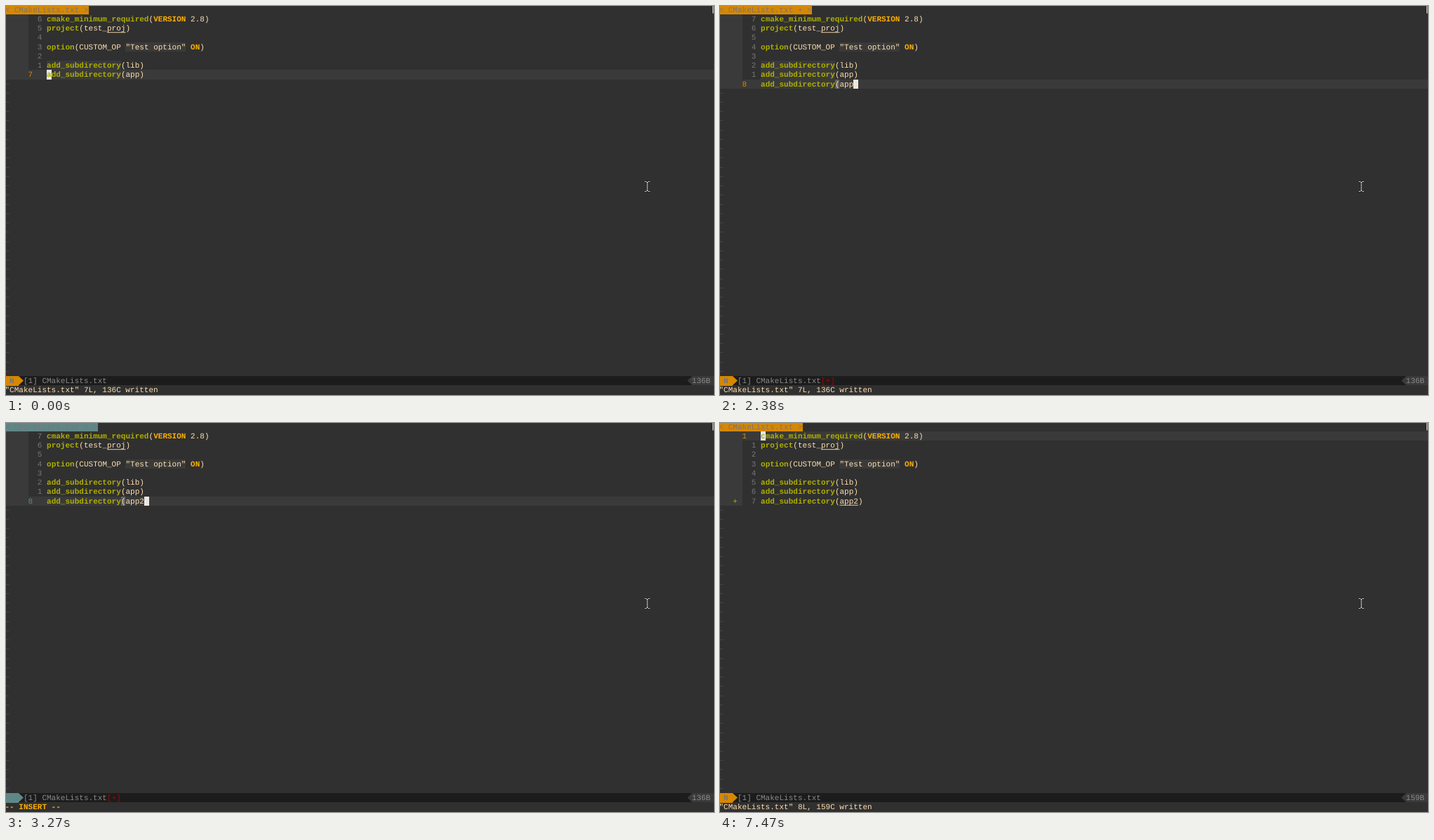
These frames come from a looping animation (1009x555 px, 8000 ms). An HTML page:

```html
<!DOCTYPE html>
<html lang="en">
<head>
<meta charset="utf-8">
<title>Editing a build file</title>
<style>
html, body { margin: 0; width: 100%; height: 100%; overflow: hidden; background: #303030; }
svg { display: block; width: 1009px; height: 555px; }
text {
  font: 11.025px "Liberation Mono", "Courier New", monospace;
  white-space: pre;
  text-rendering: geometricPrecision;
}
.bold { font-weight: bold; }
</style>
</head>
<body>
<svg id="stage" viewBox="0 0 1009 555"></svg>
<script>
(() => {
const LOOP = 8000;
const CELL_W = 6.615, CELL_H = 13.24;
const C = {
  bg: '#303030', raised: '#3a3a3a', bar: '#1c1c1c', menu: '#4e4e4e', match: '#626262',
  dim: '#767676', gray: '#8a8a8a', tilde: '#4e4e4e', fg: '#ffdfaf', green: '#afaf00',
  gold: '#ffaf00', orange: '#d78700', flash: '#ff8700', teal: '#5f8787',
  red: '#af0000', cursor: '#e8e8e8', prompt: '#c8c8c8'
};

const MENU = [
  ['app"', 'S [YANK]'], ['apply', 'S [YANK]'], ['app_stdio', 'S [YANK]'],
  ['append', '  [T]'], ['append_line', '  [T]'], ['actPreviewPageUp', '  [T]'],
  ['actPreviewPageDown', '  [T]'], ['algo.charUpper', '  [T]'], ['actPageUp', '  [T]'],
  ['actPreviewUp', '  [T]'], ['algo.TestEmptyPattern', '  [T]']
];

// Each step changes part of the editor state from its time onwards.
const STEPS = [
  [0, { args: ['lib', 'app'], row: 7, col: 0, words: true, size: '136B', keys: '',
        message: '"CMakeLists.txt" 7L, 136C written' }],
  [1040, { keys: 'y' }],
  [1190, { keys: '' }],
  [1490, { args: ['lib', 'app', 'app'], row: 8, dirty: true, flash: true }],
  [1780, { flash: false }],
  [1930, { keys: 'f' }],
  [2380, { keys: '', col: 20, paren: true }],
  [2970, { insert: true, words: false, message: '-- INSERT --' }],
  [3120, { menu: true, paren: false }],
  [3270, { menu: false, paren: true, args: ['lib', 'app', 'app2'], col: 21 }],
  [3720, { insert: false, paren: false, col: 20, spell: true, message: '' }],
  [4620, { command: true, message: ':' }],
  [5520, { message: ':w' }],
  [6270, { command: false, dirty: false, added: true, size: '159B',
           message: '"CMakeLists.txt" 8L, 159C written' }],
  [7320, { keys: 'g' }],
  [7470, { keys: '', row: 1, col: 0 }]
];

const colX = col => col * CELL_W - 1.5;
const rowY = row => row * CELL_H - 1.3;
const escapeText = s => s.replace(/&/g, '&amp;').replace(/</g, '&lt;');

function rect(x, y, w, h, fill) {
  return `<rect x="${x.toFixed(2)}" y="${y.toFixed(2)}" width="${w.toFixed(2)}" height="${h.toFixed(2)}" fill="${fill}"/>`;
}

// Cell backgrounds sit on whole pixels so that neighbouring rows meet cleanly.
function cells(col, row, cols, fill, rows = 1) {
  const x = Math.round(colX(col)), y = Math.round(rowY(row));
  return rect(x, y, Math.round(colX(col + cols)) - x, Math.round(rowY(row + rows)) - y, fill);
}

function put(col, row, str, fill, bold) {
  return `<text x="${colX(col).toFixed(2)}" y="${(rowY(row) + 9.9).toFixed(2)}" fill="${fill}"${bold ? ' class="bold"' : ''}>${escapeText(str)}</text>`;
}

const underline = (col, row, cols) =>
  rect(colX(col), rowY(row) + 12.1, cols * CELL_W, 0.9, C.fg);

function sourceLines(args) {
  return [
    [['cmake_minimum_required', C.green, 1], ['(', C.fg], ['VERSION', C.gold, 1], [' 2.8)', C.fg]],
    [['project', C.green, 1], ['(test_proj)', C.fg]],
    [],
    [['option', C.green, 1], ['(CUSTOM_OP ', C.fg], ['"Test option"', C.fg], [' ', C.fg], ['ON', C.gold, 1], [')', C.fg]],
    [],
    ...args.map(a => [['add_subdirectory', C.green, 1], [`(${a})`, C.fg]])
  ];
}

function drawBuffer(s, accent) {
  const lines = sourceLines(s.args);
  let out = cells(0, 1, 5, C.raised, lines.length);
  out += cells(5, s.row, 148, C.raised);
  out += cells(26, 4, 13, C.raised);
  if (s.words) s.args.forEach((_, i) => out += cells(9, 6 + i, 16, C.raised));
  if (s.flash) out += cells(9, 7, 21, C.flash);
  if (s.paren) out += cells(25, s.row, 1, C.match);
  if (!s.command) out += cells(9 + s.col, s.row, 1, C.cursor);

  lines.forEach((parts, i) => {
    const row = i + 1, gap = Math.abs(row - s.row);
    out += gap ? put(7, row, String(gap), C.dim) : put(5, row, String(row), accent);
    let col = 9;
    for (const [str, fill, bold] of parts) {
      out += put(col, row, str, s.flash && row === 7 ? C.bg : fill, bold);
      col += str.length;
    }
  });
  out += underline(22, 2, 4);
  if (s.spell) out += underline(26, 8, 4);
  if (s.added) out += put(3, 8, '+', C.green);
  for (let row = lines.length + 1; row < 40; row++) out += put(0, row, '~', C.tilde);
  return out;
}

function drawMenu() {
  return cells(25, 9, 32, C.menu, MENU.length) + MENU.map(([word, kind], i) =>
    put(26, 9 + i, word, C.fg) + put(48, 9 + i, kind, C.fg)).join('');
}

function drawBars(s, accent) {
  const tab = `< CMakeLists.txt ${s.dirty ? '+ ' : ''}>`;
  let out = cells(0, 0, tab.length, accent) + put(0, 0, tab, C.dim);

  const y = Math.round(rowY(40)), mid = y + 6.5, end = y + 13;
  out += rect(0, y, 1009, 13, C.bar) + cells(0, 40, 3, accent);
  out += `<path d="M18 ${y}L25 ${mid}L18 ${end}Z" fill="${accent}"/>`;
  out += `<path d="M978 ${y}L971 ${mid}L978 ${end}Z" fill="${C.raised}"/>`;
  out += rect(978, y, 31, 13, C.raised);
  if (!s.insert) out += put(1, 40, 'N', C.dim, true);
  out += put(4, 40, '[1] CMakeLists.txt', C.gray);
  if (s.dirty) out += put(22, 40, '[+]', C.red);
  out += put(148, 40, s.size, C.gray);

  if (s.command) out += cells(s.message.length, 41, 1, C.prompt);
  out += put(0, 41, s.message, s.insert ? C.gold : C.fg, s.insert);
  return out + put(142, 41, s.keys, C.fg);
}

function drawPointer() {
  const shape = 'M910.5 250.5H912.5L914 252L915.5 250.5H917.5M914 252V263M910.5 264.5H912.5L914 263L915.5 264.5H917.5';
  return `<g fill="none"><path d="${shape}" stroke="#202020" stroke-width="2.4"/>` +
    `<path d="${shape}" stroke="#dcdcdc" stroke-width="1"/></g>` +
    rect(1007, 0, 1.2, 10.5, '#e4e4e4');
}

const stage = document.getElementById('stage');
let shown = -1;

function render(time) {
  const t = time % LOOP;
  const step = STEPS.filter(([at]) => at <= t).length;
  if (step === shown) return;
  shown = step;
  const s = Object.assign({}, ...STEPS.slice(0, step).map(([, change]) => change));
  const accent = s.insert ? C.teal : C.orange;
  stage.innerHTML = rect(0, 0, 1009, 555, C.bg) + drawBuffer(s, accent) +
    drawBars(s, accent) + (s.menu ? drawMenu() : '') + drawPointer();
}

const begin = performance.now();
function tick() {
  render(Math.max(0, performance.now() - begin));
  requestAnimationFrame(tick);
}
tick();
})();
</script>
</body>
</html>
```
